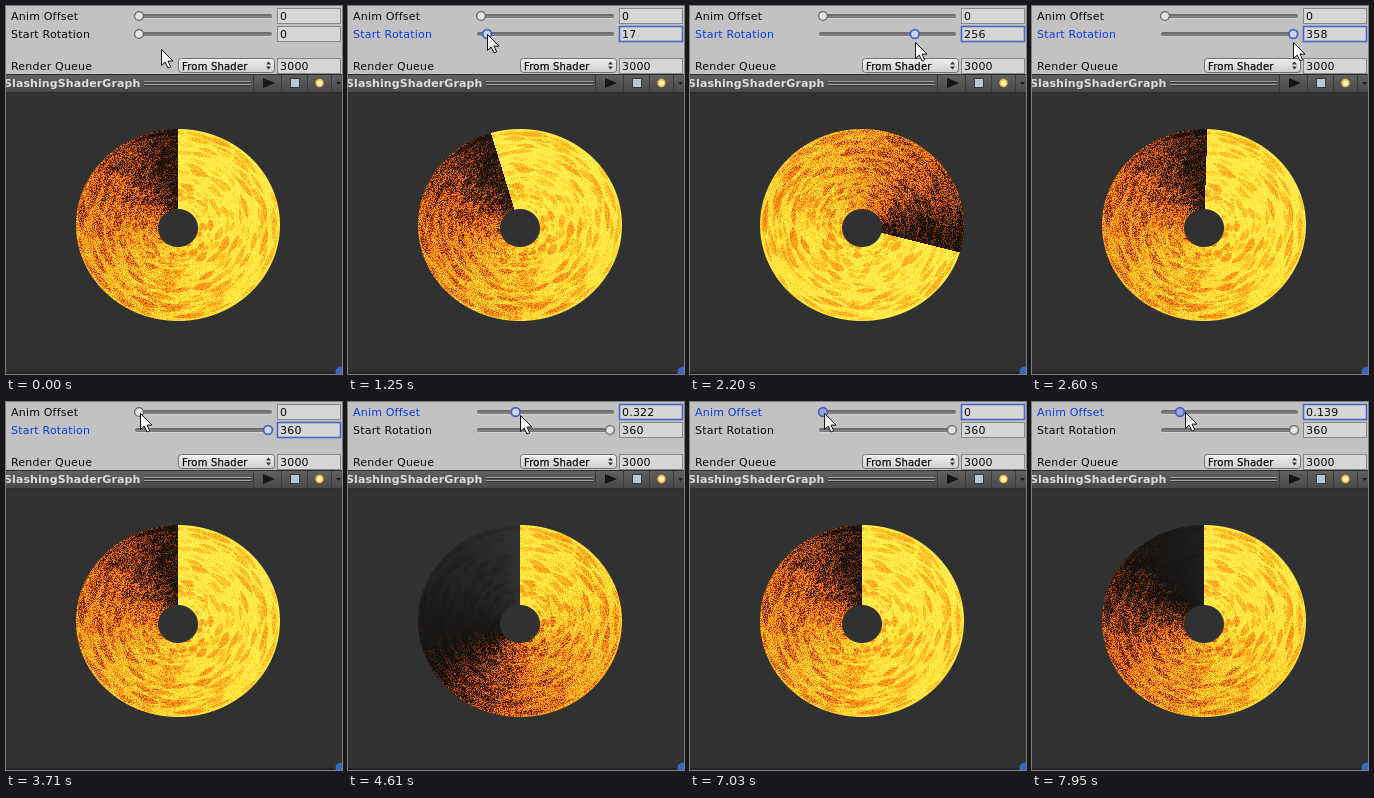
An HTML page with a canvas that plays this animation: 336 by 368 pixels, repeating every 7990 ms.

```html
<!DOCTYPE html>
<html lang="en">
<head>
<meta charset="utf-8">
<title>Slash shader inspector</title>
<style>
html, body { margin: 0; width: 336px; height: 368px; overflow: hidden; background: #313131; }
canvas, svg { position: absolute; left: 0; top: 0; display: block; }
text { font: 11px "DejaVu Sans", sans-serif; letter-spacing: .2px; fill: #0a0a0a; white-space: pre; }
.title { font-weight: bold; letter-spacing: .1px; fill: #dedede; }
.popup { font-size: 10px; letter-spacing: .2px; stroke: #0a0a0a; stroke-width: .25; }
.field { fill: #d6d6d6; stroke: #858585; }
.knob { fill: #e4e4e4; stroke: #666; stroke-width: 1.3; }
.on text { fill: #0a3ce0; }
.on .value { fill: #0a0a0a; }
.on .field { stroke: #4a64c8; stroke-width: 1.6; }
.on .knob { fill: #ccd3ec; stroke: #4a62bc; stroke-width: 1.8; }
.on.held .knob { fill: #96a4d6; }
</style>
</head>
<body>
<canvas id="disc" width="336" height="368"></canvas>
<svg width="336" height="368" viewBox="0 0 336 368">
  <defs>
    <linearGradient id="bar" x2="0" y2="1"><stop stop-color="#626262"/><stop offset="1" stop-color="#484848"/></linearGradient>
    <linearGradient id="pop" x2="0" y2="1"><stop stop-color="#f0f0f0"/><stop offset="1" stop-color="#cfcfcf"/></linearGradient>
    <g id="track">
      <rect x="129" y="-2" width="137" height="4" rx="2" fill="#6e6e6e"/>
      <path d="M130 .8H265" stroke="#929292"/>
      <path d="M130 2.5H265" stroke="#d2d2d2"/>
    </g>
  </defs>
  <rect width="336" height="68" fill="#c2c2c2"/>
  <g id="offset" transform="translate(0 10)">
    <text x="5" y="4">Anim Offset</text>
    <use href="#track"/>
    <circle class="knob" r="4.4"/>
    <rect class="field" x="271.5" y="-7.5" width="63" height="15"/>
    <text class="value" x="274" y="4">0</text>
  </g>
  <g id="rotation" transform="translate(0 28)">
    <text x="5" y="4">Start Rotation</text>
    <use href="#track"/>
    <circle class="knob" r="4.4"/>
    <rect class="field" x="271.5" y="-7.5" width="63" height="15"/>
    <text class="value" x="274" y="4">0</text>
  </g>
  <text x="5" y="64">Render Queue</text>
  <rect x="172.5" y="52.5" width="96" height="14" rx="3" fill="url(#pop)" stroke="#707070"/>
  <text class="popup" x="176" y="63.500">From Shader</text>
  <path d="M260 58.5L262.5 55.5L265 58.5ZM260 60.5L262.5 63.5L265 60.5Z" fill="#333"/>
  <rect class="field" x="271.5" y="52.5" width="63" height="15"/>
  <text x="274" y="64">3000</text>

  <rect y="68" width="336" height="18" fill="url(#bar)"/>
  <path d="M0 68.5H336M0 86.5H336" stroke="#2c2c2c"/>
  <text class="title" x="-2" y="81">SlashingShaderGraph</text>
  <path d="M138 75.5H245M138 78.5H245" stroke="#a4a4a4"/>
  <path d="M138 76.5H245M138 79.5H245" stroke="#343434"/>
  <path d="M247.5 69V86M275.5 69V86M301.5 69V86M325.5 69V86" stroke="#3a3a3a"/>
  <path d="M257 72L269 77L257 82Z" fill="#151515"/>
  <rect x="284.5" y="72.5" width="9" height="9" fill="#b9c8d2" stroke="#303a40"/>
  <circle cx="313.500" cy="77" r="4.2" fill="#f0c040"/>
  <circle cx="313.500" cy="77" r="2.6" fill="#fff4c0"/>
  <path d="M330 76H335L332.500 79Z" fill="#1c1c1c"/>
  <path d="M0 367H336" stroke="#252323" stroke-width="2"/>
  <circle cx="335" cy="366" r="5.5" fill="#3868c0"/>
  <path id="cursor" d="M0 0V16L3.700 12.600L6.500 18.500L9.200 17.300L6.500 11.600H11.500Z" fill="#fff" stroke="#111" stroke-linejoin="round"/>
</svg>
<script>
const LOOP = 7990, MAX_OFFSET = 1.2, CLICK = 7000;

const clamp = (x, a = 0, b = 1) => Math.min(b, Math.max(a, x));
const smooth = (a, b, x) => { x = clamp((x - a) / (b - a)); return x * x * (3 - 2 * x); };
const linear = (a, b, x) => clamp((x - a) / (b - a));

// The rotation drag speeds up after its first part.
const rotationAt = t => 100 * linear(1150, 1740, t) + 156 * linear(1740, 2200, t) + 104 * linear(2200, 2610, t);
const offsetAt = t => t < CLICK ? MAX_OFFSET * linear(4120, 5950, t) : .139 * linear(7250, 7950, t);
const knobX = part => 133 + 129 * part;

// Free cursor moves: start, end, x, y.
const glides = [[230, 510, 120, 28], [740, 770, 131, 27], [2730, 2990, 283, 30],
  [3210, 3560, 86, 4], [3560, 3700, 134, 11], [6330, 6950, 134, 11]];

function cursorAt(t) {
  let x = 155, y = 43;
  const glide = ([from, to, gx, gy]) => {
    const k = linear(from, to, t);
    x += (gx - x) * k;
    y += (gy - y) * k;
  };
  const drag = (from, to, part, dx, dy) => {
    if (t < from) return;
    x = knobX(part) + dx * linear(from, to, t);
    y += dy * linear(from, to, t);
  };
  glides.slice(0, 2).forEach(glide);
  drag(1120, 2000, rotationAt(t) / 360, 0, 9);
  glides.slice(2, 5).forEach(glide);
  drag(4120, 4500, MAX_OFFSET * linear(4120, 5950, t) / MAX_OFFSET, 4, 2);
  glide(glides[5]);
  drag(7250, 7950, offsetAt(t) / MAX_OFFSET, 5, -1);
  return [x, y];
}

let seed = 7;
const random = () => (seed = (seed * 1664525 + 1013904223) >>> 0) / 4294967296;
const table = Float32Array.from({ length: 4096 }, random);

// Depth of the curved brush strokes in a polar grid, one stroke at most in each cell.
function strokes(turn, r, count, rows) {
  const row = Math.floor(r * rows);
  const a = turn * count + table[row + count];
  const col = Math.floor(a) % count;
  const id = col * 41 + row * 173 + count * 7;
  const pick = k => table[(id + k * 1009) & 4095];
  const da = a - Math.floor(a) - .5;
  const dr = r * rows - row - .5 + (pick(1) - .5) * .7 * da + (pick(2) - .5) * .2;
  const width = (.2 + .24 * pick(3)) * (1 - da * da * 4.1);
  return smooth(-.08, .08, width - Math.abs(dr)) * smooth(.4, .75, pick(4));
}

const shades = Array.from({ length: 256 }, (_, i) => {
  const h = i / 255;
  return [16 + 239 * smooth(0, .55, h), 13 + 227 * smooth(0, 1, h), 11 + 80 * h ** 3];
});

const pixels = [];
for (let y = 122; y < 317; y++) for (let x = 69; x < 276; x++) {
  const dx = x + .5 - 172, dy = y + .5 - 222;
  const d = Math.hypot(dx / 102, (y + .5 - 219) / 96);
  const hole = Math.hypot(dx / 20, dy / 19);
  const cover = clamp((1 - d) * 98 + .5) * clamp((hole - 1) * 19.5 + .5);
  if (!cover) continue;
  const turn = Math.atan2(dx, -dy) / (2 * Math.PI);
  pixels.push({ at: (y * 336 + x) * 4, cover, turn, r: clamp((d - .18) / .82, 0, .999), grain: random() - .5 });
}

const ctx = document.getElementById("disc").getContext("2d");
const image = ctx.createImageData(336, 368);
let drawn = "";

function drawDisc(rotation, offset) {
  const key = rotation + "/" + offset;
  if (key === drawn) return;
  drawn = key;
  for (const p of pixels) {
    let turn = p.turn + rotation / 360;
    turn -= Math.floor(turn);
    const age = turn + offset;
    const streak = Math.max(strokes(turn, p.r, 17, 9), .8 * strokes(turn, p.r, 23, 12), .6 * strokes(turn, p.r, 31, 15));
    const heat = .92 - .84 * age ** 3 - streak * .27 * (1 - .5 * smooth(.5, .9, age));
    const h = heat + p.grain * (.2 + .2 * smooth(.35, .7, age));
    const fade = clamp((1.34 - age) / .4 + (streak - .3) * .16 * smooth(1, 1.2, age)) * (1 - smooth(1.25, 1.5, age));
    const c = shades[clamp(h) * 255 | 0];
    for (let i = 0; i < 3; i++) image.data[p.at + i] = c[i];
    image.data[p.at + 3] = 255 * p.cover * fade;
  }
  ctx.putImageData(image, 0, 0);
}

function slider(id) {
  const row = document.getElementById(id);
  const knob = row.querySelector(".knob"), value = row.querySelector(".value");
  return (part, text, active, held) => {
    knob.setAttribute("cx", knobX(part));
    value.textContent = text;
    row.setAttribute("class", (active ? "on" : "") + (held ? " held" : ""));
  };
}
const setOffset = slider("offset"), setRotation = slider("rotation");
const cursor = document.getElementById("cursor");

function show(now) {
  const t = now % LOOP;
  const rotation = Math.round(rotationAt(t));
  const offset = Math.round(offsetAt(t) * 1000) / 1000;
  const [x, y] = cursorAt(t);
  drawDisc(rotation, offset);
  setOffset(offset / MAX_OFFSET, String(offset), t >= 4090, t >= CLICK);
  setRotation(rotation / 360, String(rotation), t >= 1120 && t < 4090, false);
  cursor.setAttribute("transform", `translate(${Math.round(x) + .5} ${Math.round(y) + .5})`);
}

const start = performance.now();
function tick() {
  show(performance.now() - start);
  requestAnimationFrame(tick);
}
tick();
</script>
</body>
</html>
```
